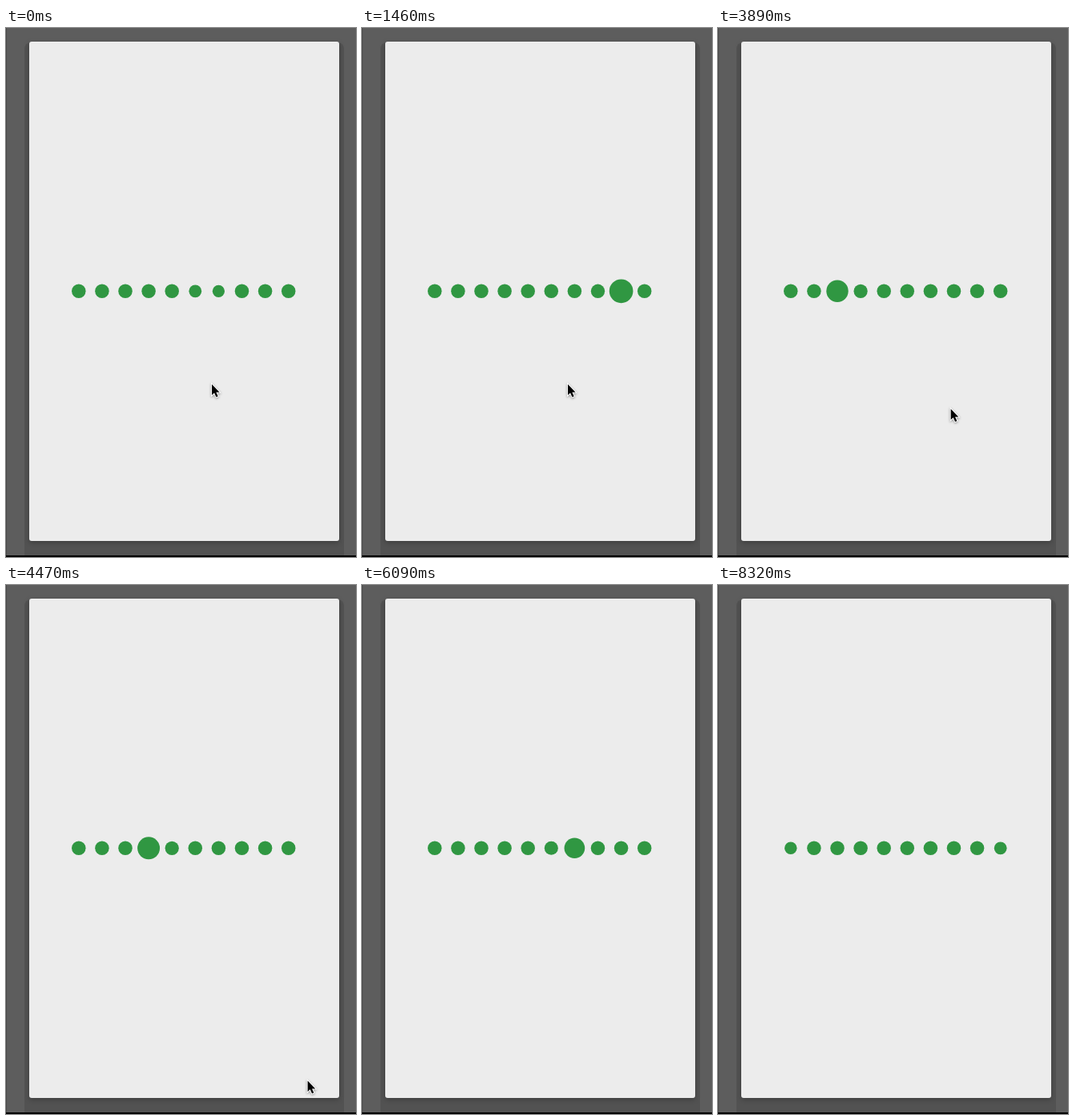
An HTML page with a canvas that plays this animation: 437 px wide and 660 px high, repeating every 8420 ms.

```html
<!DOCTYPE html>
<html lang="en">
<head>
<meta charset="utf-8">
<title>Dot wave</title>
<style>
  html, body { margin: 0; width: 100%; height: 100%; overflow: hidden; background: #5d5d5d; }
  canvas { display: block; }
</style>
</head>
<body>
<canvas id="stage" width="437" height="660"></canvas>
<script>
const ctx = document.getElementById('stage').getContext('2d');

const LOOP = 8420, TICK = 57.85;
const DOTS = 10, RADIUS = 8.75, STEP = 583;
const FIRST_DOT_LAG = 0.18;
const arrow = new Path2D('M0 0V13.6L3.1 10.7 5.4 16 7.7 15 5.4 9.9H9.6Z');

// Pointer route: time, x, y
const route = [
  [3430, 257, 444.5], [3490, 259, 449], [3890, 291, 475.5],
  [4360, 367, 588], [4620, 391, 664]
];

// The picture advances in ticks and hangs for a moment near the end
function tickTime(t) {
  if (t >= 8320) return 8320;
  if (t >= 8260) return 8260;
  if (t >= 8120) return 8120;
  return t < 60 ? 0 : 10 + Math.floor((t - 10) / TICK) * TICK;
}

// Dips below zero first, then shoots up to one
const anticipate = u => u * u * (3 * u - 2);

function dotScale(i, t) {
  const peak = i === 0 ? FIRST_DOT_LAG : i;
  const position = 5.435 + t / STEP;
  const offset = (position - peak + 1.5 * DOTS) % DOTS - DOTS / 2;
  return 1 + anticipate(Math.max(0, 1 - Math.abs(offset)));
}

function pointerAt(t) {
  if (t <= route[0][0]) return route[0].slice(1);
  const n = route.findIndex(stop => stop[0] > t);
  if (n < 0) return null;
  const [t0, x0, y0] = route[n - 1], [t1, x1, y1] = route[n];
  const k = (t - t0) / (t1 - t0);
  return [x0 + (x1 - x0) * k, y0 + (y1 - y0) * k];
}

function shadow(color, blur, dy) {
  ctx.shadowColor = color;
  ctx.shadowBlur = blur;
  ctx.shadowOffsetY = dy;
}

function panel(x, y, w, h, r, color) {
  ctx.fillStyle = color;
  ctx.beginPath();
  ctx.roundRect(x, y, w, h, r);
  ctx.fill();
}

function drawBackdrop() {
  ctx.fillStyle = '#5d5d5d';
  ctx.fillRect(0, 0, 437, 660);
  panel(23, 18, 399, 650, 8, '#525252');
  ctx.fillStyle = '#484848';
  ctx.fillRect(0, 0, 1, 660);
  ctx.fillStyle = '#000';
  ctx.fillRect(0, 658, 437, 2);
  ctx.save();
  shadow('rgba(0,0,0,.25)', 6, 2);
  panel(29, 17, 387, 623, 3, '#ececec');
  ctx.restore();
}

function drawPointer(x, y) {
  ctx.save();
  ctx.translate(x, y);
  ctx.lineWidth = 2;
  ctx.strokeStyle = '#fff';
  shadow('rgba(0,0,0,.4)', 3, 1);
  ctx.stroke(arrow);
  shadow('transparent', 0, 0);
  ctx.fillStyle = '#000';
  ctx.fill(arrow);
  ctx.restore();
}

function draw(now) {
  const t = tickTime(now % LOOP);
  drawBackdrop();
  ctx.fillStyle = '#309742';
  for (let i = 0; i < DOTS; i++) {
    ctx.beginPath();
    ctx.arc(90.8 + 29.1 * i, 328.3, RADIUS * dotScale(i, t), 0, 2 * Math.PI);
    ctx.fill();
  }
  const pointer = pointerAt(t);
  if (pointer) drawPointer(...pointer);
}

let start;
function frame(now) {
  start ??= now;
  draw(now - start);
  requestAnimationFrame(frame);
}
draw(0);
requestAnimationFrame(frame);
</script>
</body>
</html>
```
